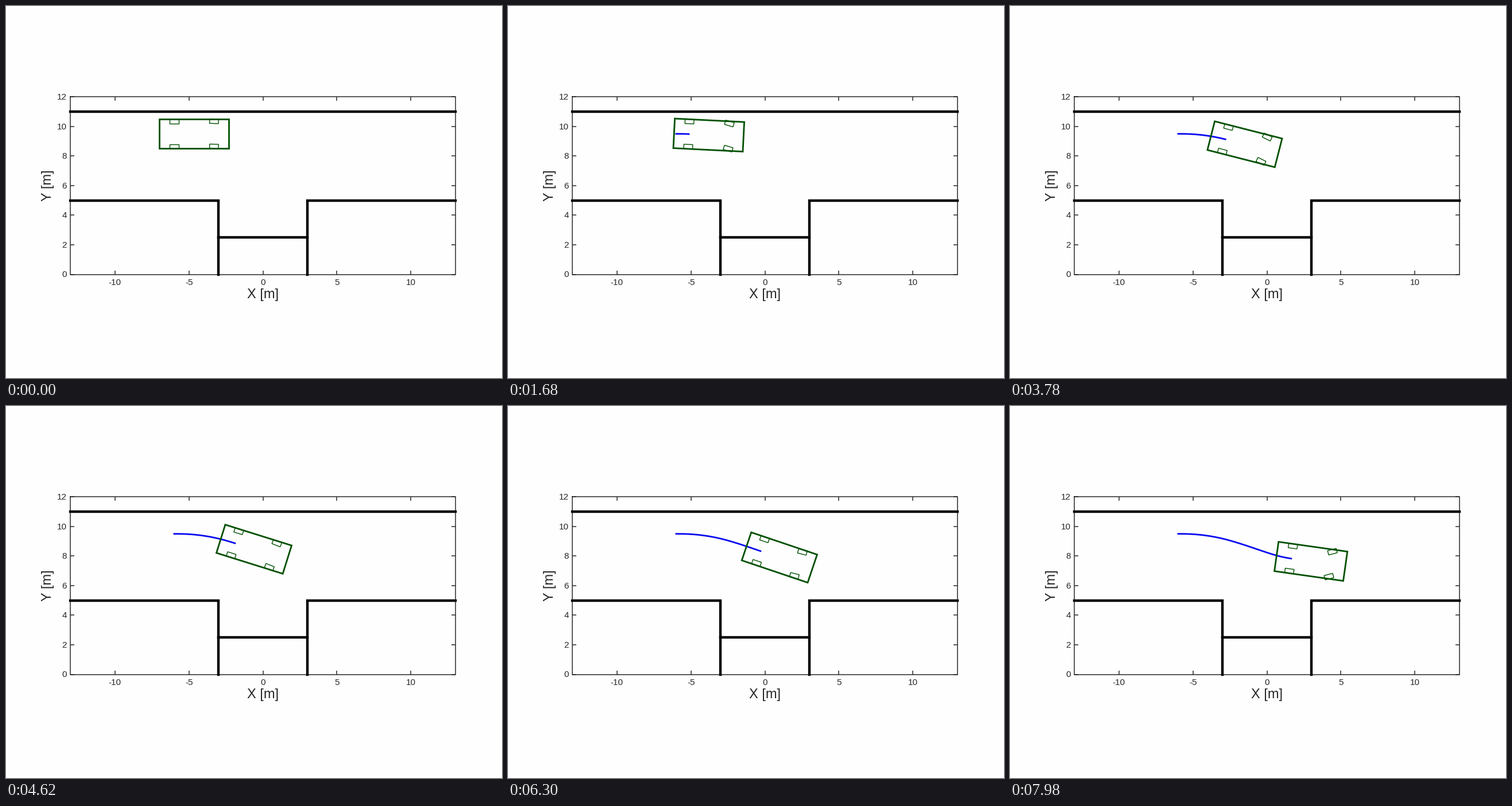
Animation of 864 by 648 pixels, one loop 8 s. Source, as a matplotlib script:

```python
import numpy as np
import matplotlib.pyplot as plt
from matplotlib.animation import FuncAnimation
from matplotlib.patches import Polygon

WIDTH, HEIGHT, DPI = 864, 648, 100
PX = 72 / DPI                       # one pixel in points
SCALE, ORIGIN = 25.77, np.array([447.5, 467.5])
STEP_MS, TICK_MS, LOOP_MS = 210, 20, 8000
GREEN, BLUE, INK = "#005000", "#0808f0", "#262626"

# Car geometry in metres, measured from the rear axle
WHEELBASE, REAR, FRONT, HALF_WIDTH = 2.7, -1.0, 3.7, 1.0
WHEEL_LENGTH, WHEEL_WIDTH = 0.6, 0.3
WHEEL_Y = HALF_WIDTH - WHEEL_WIDTH / 2


def to_px(points):
    return ORIGIN + SCALE * np.asarray(points, float) * [1, -1]


def hermite(x, keys, values, slopes):
    """Cubic Hermite curve and its derivative at x."""
    i = np.clip(np.searchsorted(keys, x, side="right") - 1, 0, len(keys) - 2)
    h = keys[i + 1] - keys[i]
    u = (x - keys[i]) / h
    a, b = values[i], values[i + 1]
    m, n = slopes[i] * h, slopes[i + 1] * h
    c2, c3 = 3 * (b - a) - 2 * m - n, 2 * (a - b) + m + n
    return a + u * (m + u * (c2 + u * c3)), (m + u * (2 * c2 + 3 * u * c3)) / h


# Distance driven over time steps
step_keys = np.array([0, 5, 8, 10, 14, 20, 22, 25, 30, 34, 38.0])
dist_keys = np.array([0, .32, .86, 1.305, 2.28, 3.70, 4.18, 4.78, 5.86, 6.79, 7.86])
speeds = np.gradient(dist_keys, step_keys, edge_order=2)
speeds[0] = 0
steps = np.arange(39)
distance = hermite(steps, step_keys, dist_keys, speeds)[0]

# Heading over distance; its slope follows from the steering angle
turn_at = np.array([0, .86, 2.28, 4.18, 5.86, 6.79, 7.86])
heading_keys = -np.radians([0, 2.85, 9.73, 17.4, 18.64, 15.65, 8.06])
steer_keys = -np.radians([2, 13.5, 12.5, 4, -4.5, -15.5, -23])
curvature_keys = np.tan(steer_keys) / WHEELBASE


def heading_at(s):
    return hermite(s, turn_at, heading_keys, curvature_keys)


# Rear axle path by integrating the heading
grid = np.linspace(0, distance[-1], 800)
theta = heading_at(grid)[0]
tangent = np.column_stack([np.cos(theta), np.sin(theta)])
moves = (tangent[1:] + tangent[:-1]) / 2 * np.diff(grid)[:, None]
path = np.array([-6, 9.5]) + np.vstack([[0, 0], np.cumsum(moves, axis=0)])


def rotate(points, angle):
    c, s = np.cos(angle), np.sin(angle)
    return np.asarray(points) @ np.array([[c, s], [-s, c]])


def box(x0, x1, half):
    return np.array([[x0, -half], [x1, -half], [x1, half], [x0, half]])


fig = plt.figure(figsize=(WIDTH / DPI, HEIGHT / DPI), dpi=DPI, facecolor="#fefefe")
ax = fig.add_axes([0, 0, 1, 1])
ax.set_xlim(0, WIDTH)
ax.set_ylim(HEIGHT, 0)
ax.axis("off")


def line(points, color, width, cap="projecting", z=2):
    xy = np.asarray(points, float).reshape(-1, 2)
    return ax.plot(xy[:, 0], xy[:, 1], color=color, lw=width * PX, zorder=z,
                   solid_capstyle=cap, solid_joinstyle="miter")[0]


def label(x, y, text, size, **options):
    ax.text(x, y, text, fontsize=size * PX, color=INK, family="Liberation Sans",
            va="baseline", **options)


def outline(width):
    return ax.add_patch(Polygon(np.zeros((4, 2)), closed=True, fill=False, ec=GREEN,
                                lw=width * PX, joinstyle="miter", zorder=5))


# Axes frame, ticks and labels
left, bottom = to_px([-13, 0])
right, top = to_px([13, 12])
line([[left, top], [right, top], [right, bottom], [left, bottom], [left, top]], INK, 1.5)
for value in range(-10, 11, 5):
    x = to_px([value, 0])[0]
    line([[x, bottom], [x, bottom - 7]], INK, 1.5, "butt")
    line([[x, top], [x, top + 7]], INK, 1.5, "butt")
    label(x, 486.2, str(value), 15.2, ha="center")
for value in range(0, 13, 2):
    y = to_px([0, value])[1]
    line([[left, y], [left + 7, y]], INK, 1.5, "butt")
    line([[right, y], [right - 7, y]], INK, 1.5, "butt")
    label(106, y + 5, str(value), 15.2, ha="right")
label(447.5, 509.5, "X [m]", 23.6, ha="center")
ax.text(78.5, 313, "Y [m]", fontsize=23.6 * PX, color=INK, family="Liberation Sans",
        rotation=90, rotation_mode="anchor", ha="center", va="baseline")

# Road edges and parking bay
for wall in ([[-13, 11], [13, 11]],
             [[-13, 5], [-3, 5], [-3, 0]],
             [[13, 5], [3, 5], [3, 0]],
             [[-3, 2.5], [3, 2.5]]):
    line(to_px(wall), "black", 4.4, z=3)

trail = line([], BLUE, 2.8, z=4)
body = outline(2.8)
wheels = [outline(1.4) for _ in range(4)]
mounts = [(x, side * WHEEL_Y) for x in (0, WHEELBASE) for side in (1, -1)]
body_shape = box(REAR, FRONT, HALF_WIDTH)
wheel_shape = box(-WHEEL_LENGTH / 2, WHEEL_LENGTH / 2, WHEEL_WIDTH / 2)


def update(tick):
    step = tick * TICK_MS // STEP_MS
    s = distance[step]
    heading, curvature = heading_at(s)
    steer = np.arctan(WHEELBASE * curvature)
    axle = np.array([np.interp(s, grid, path[:, k]) for k in (0, 1)])

    driven = np.vstack([path[grid < s], axle]) if step else np.empty((0, 2))
    trail.set_data(*to_px(driven).T)
    body.set_xy(to_px(axle + rotate(body_shape, heading)))
    for wheel, mount in zip(wheels, mounts):
        shape = rotate(wheel_shape, steer if mount[0] else 0) + mount
        wheel.set_xy(to_px(axle + rotate(shape, heading)))
    return [trail, body, *wheels]


anim = FuncAnimation(fig, update, frames=LOOP_MS // TICK_MS, interval=TICK_MS,
                     repeat=True, repeat_delay=0)
plt.show()
```
